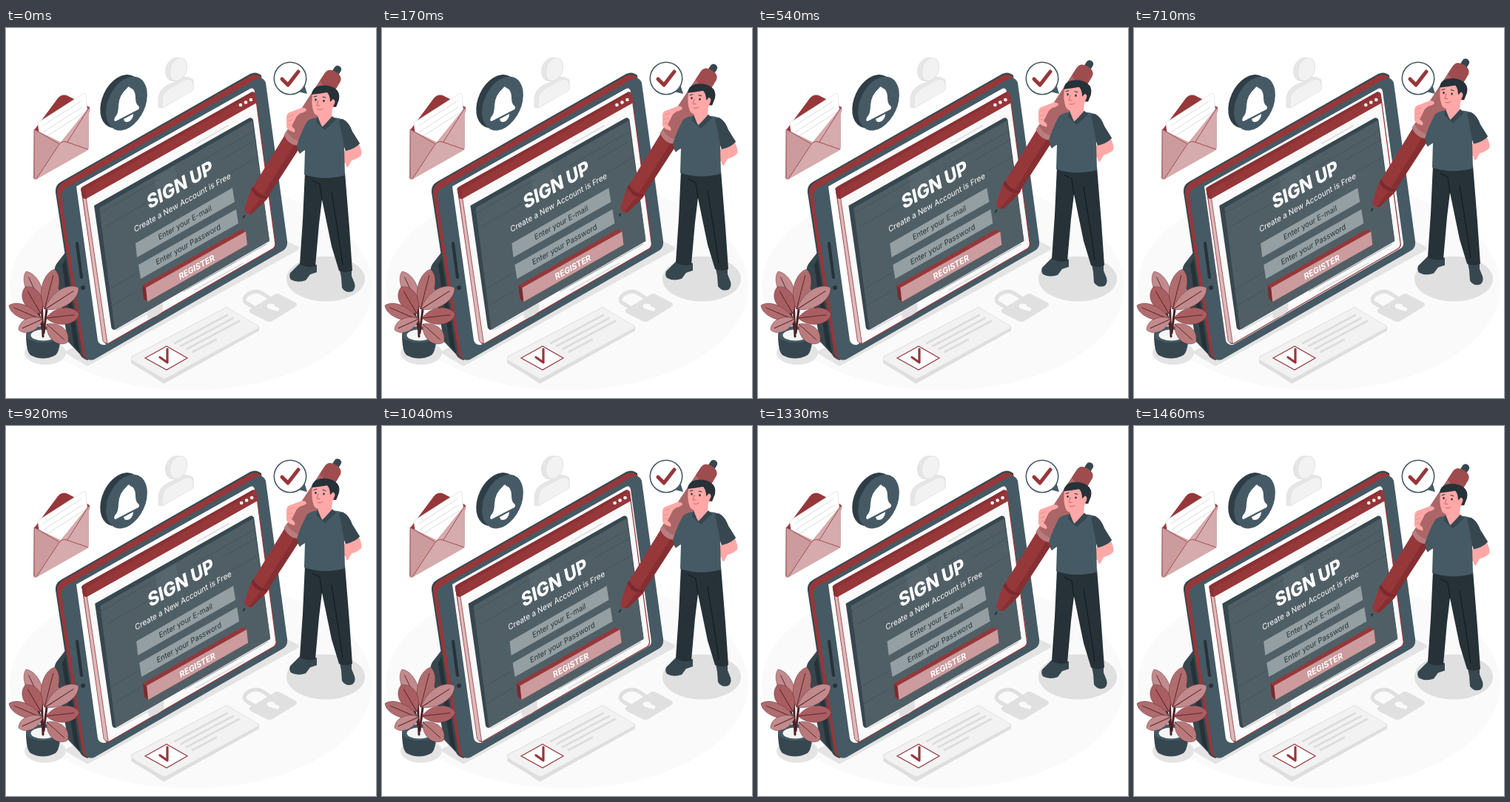
Recreate the animation shown at these times as an HTML page. Size 500x500 px, loop 1.5 s.

```html
<!DOCTYPE html>
<html lang="en">
<head>
<meta charset="utf-8">
<title>Sign up</title>
<style>
html, body { margin: 0; height: 100%; overflow: hidden; background: #fff; }
svg { display: block; width: 100vw; height: 100vh; }
text { font-family: Inter, Roboto, sans-serif; text-anchor: middle; }
.ink { fill: #263238; } .slate { fill: #37474f; } .steel { fill: #455a64; }
.red { fill: #96373a; } .wine { fill: #7b2a2e; } .rose { fill: #cb9b9d; } .skin { fill: #ffa8a7; }
.line { fill: none; stroke-linecap: round; stroke-linejoin: round; }
</style>
</head>
<body>
<svg viewBox="0 0 500 500">
  <ellipse cx="250" cy="349" rx="245" ry="141" fill="#fafafa"/>
  <g fill="#e4e4e4">
    <path d="M78 438L110 457 393 301Q398 298 394 295L378 287Z"/>
    <ellipse cx="53" cy="439" rx="28" ry="16"/>
    <ellipse cx="432" cy="339" rx="53" ry="30.500" fill="#e0e0e0"/>
  </g>

  <!-- person icon -->
  <g stroke="#e0e0e0" stroke-width=".8">
    <path d="M206 107V97Q206 84 217 78L241 66Q248 66 253 70V83L211 108Z" fill="#e6e6e6"/>
    <path d="M211 108V99Q211 87 222 81L240 71Q252 66 253 77V84Z" fill="#f2f2f2"/>
    <ellipse cx="228" cy="56" rx="12" ry="16" transform="rotate(20 228 56)" fill="#e6e6e6"/>
    <ellipse cx="233" cy="56" rx="11" ry="16" transform="rotate(20 233 56)" fill="#f2f2f2"/>
  </g>

  <!-- bell badge -->
  <ellipse cx="155" cy="99" rx="25" ry="38" transform="rotate(25 155 99)" fill="#2f3e46"/>
  <ellipse cx="163" cy="102" rx="25" ry="38.500" transform="rotate(25 163 102)" class="steel"/>
  <path d="M163 82Q166 77 168 81Q175 83 175 94Q175 103 179 105Q181 108 179 110L148 126Q145 126 147 121Q152 116 152 105Q153 90 163 82ZM159 123L172 116Q172 122 167 126Q160 129 159 123Z" fill="#fff"/>

  <!-- envelope -->
  <path d="M38 138L70 95Q76 88 84 92L113 107 109 145 45 178Z" class="red"/>
  <path d="M43 128L104 89Q107 87 108 90L112 142 75 165 47 158Z" fill="#fff" stroke="#ddd" stroke-width=".7"/>
  <path d="M50 132L101 99M51 140L103 107M52 148L104 115" class="line" stroke="#ddd"/>
  <path d="M38 137L74 154 112 107V161Q112 164 109 166L42 204Q38 206 38 202Z" fill="#d5abad"/>
  <path d="M38 137L72 156 41 204Q37 206 37 202Z" fill="#cb9b9d"/>
  <path d="M41 204L72 157Q76 152 82 154L111 164M83 154L112 108M38 137L71 156M38 138V203" class="line" stroke="#96373a" stroke-width=".8"/>

  <!-- tablet -->
  <path d="M82 301L68 319Q64 326 67 333L84 424 102 443 100 300Z" class="slate"/>
  <path d="M84 303L76 321 92 430 102 443 100 300Z" class="ink"/>
  <path d="M67 222Q66 213 74 208L330 62Q338 58 345 64L375 290 110 449Q101 446 100 440Z" class="slate"/>
  <path d="M69 224Q68 215 76 209L331 64Q339 61 345 67L372 292 111 448Q104 445 103 440Z" class="red"/>
  <path d="M75 229Q74 220 81 216L336 70Q347 64 351 74L380 288Q381 297 374 301L119 448Q109 451 107 441Z" class="steel"/>
  <path d="M95 214L330 82Q335 80 336 86L364 291Q364 296 360 298L134 428Q126 429 124 422Z" fill="#fff"/>
  <path d="M96 291L102 337" class="line" stroke="#263238" stroke-width="4"/>
  <circle cx="104" cy="351" r="3" class="ink"/>

  <!-- browser window and form -->
  <g id="form">
    <path d="M102 218L332 87Q336 86 337 90L364 292Q364 296 361 298L139 426Q134 428 133 423Z" fill="#fafafa" stroke="#96373a" stroke-width="1.300"/>
    <path d="M102 218L108 228 137 426Q134 427 131 423Z" fill="#dcb9ba" stroke="#96373a" stroke-width=".8"/>
    <path d="M101 217Q102 215 106 213L332 87Q336 86 337 90L339 101 108 231Q104 231 103 228Z" class="red"/>
    <path d="M101 217Q102 215 106 213L332 87 334 90 107 218 108 231Q104 231 103 228Z" class="wine" opacity=".45"/>
    <g fill="#fff"><circle cx="317" cy="104" r="2.300"/><circle cx="324" cy="100.500" r="2.300"/><circle cx="331" cy="97" r="2.300"/></g>
    <path d="M258 156L300 132M150 408L190 386M255 354L320 318M245 352L310 316" class="line" stroke="#e0e0e0" stroke-width="2"/>
    <path d="M190 382L212 371V382Q205 390 192 393Z" fill="#e0e0e0"/>
    <path d="M119 240L328 122Q332 120 334 124L356 287 146 408Q142 407 142 402Z" class="slate"/>
    <path d="M126 243L333 125 356 288 147 408Z" fill="#505f66"/>
    <path d="M127 250L208 204M135 268L189 237M250 188L336 139M290 178L338 151M139 353L178 331M142 376L178 355M240 356L352 292M302 196L341 174" class="line" stroke="#37474f" opacity=".45"/>
    <path d="M200 202L228 186 234 216 206 232Z" fill="#fff" opacity=".04"/>
    <path d="M175 291L306 216 309 235 177 310ZM179 320L311 245 314 264 182 339Z" fill="#949fa3"/>
    <path d="M184 348L318 272 324 275 326 293 191 370 186 366Z" class="red"/>
    <path d="M184 348L189 352 191 370 186 366Z" class="wine"/>
    <path d="M189 351L324 275 326 293 191 370Z" class="rose"/>
    <g id="labels"></g>
  </g>

  <!-- card -->
  <path d="M170 451L297 384 342 409 213 481Z" fill="#e6e6e6"/>
  <path d="M169 444L298 377 342 403V409L214 480 169 453Z" fill="#dedede"/>
  <path d="M169 445L295 379Q298 377 301 379L340 402Q343 404 340 406L217 473Q214 475 211 473L169 448Z" fill="#f2f2f2" stroke="#e0e0e0" stroke-width=".7"/>
  <path d="M188 446L217 430 245 446 217 462Z" fill="#fff" stroke="#96373a" stroke-width="1.200"/>
  <path d="M208 445L218 452V434" class="line" stroke="#96373a" stroke-width="3.200"/>
  <path d="M228 426L299 388M236 430L307 392M244 434L315 396M252 438L284 421" class="line" stroke="#dcdcdc" stroke-width="2.600"/>

  <!-- lock -->
  <path d="M337 379L324 371Q319 365 328 359Q338 353 347 359L361 368" class="line" stroke="#e0e0e0" stroke-width="5"/>
  <path d="M330 380L363 360Q366 358 370 360L391 371Q395 374 391 377L360 396Q356 398 352 396L330 385Q327 382 330 380Z" fill="#e0e0e0"/>
  <ellipse cx="358" cy="376" rx="5.500" ry="3.500" fill="#fafafa"/>
  <path d="M359 374L370 379 367 383 355 379Z" fill="#fafafa"/>

  <!-- plant -->
  <path d="M27 413Q27 437 33 442Q50 451 67 442Q73 437 74 413Z" class="slate"/>
  <ellipse cx="50.500" cy="414" rx="23.500" ry="11" class="steel"/>
  <ellipse cx="50.500" cy="415" rx="17" ry="7.500" fill="#f5f5f5"/>
  <path d="M50 417L48 366M51 412L55 380M49 405L44 385" class="line" stroke="#4b2226" stroke-width="3"/>
  <g id="plant"></g>

  <!-- speech bubble -->
  <path d="M395 86L407 89 403 76Z" class="steel"/>
  <circle cx="384" cy="68" r="21.700" fill="#fff" stroke="#455a64" stroke-width="1.600"/>
  <path d="M373 69L381 77 395 59" class="line" stroke="#96373a" stroke-width="5"/>

  <!-- man with pen -->
  <g id="man">
    <path d="M407 124Q398 138 390 158L397 170 413 156Z" class="slate"/>
    <g transform="translate(448 56) rotate(32.200)">
      <rect x="-5" y="-5" width="10" height="16" rx="4.500" class="slate"/>
      <path d="M-12 14Q-12 4 0 4Q12 4 12 14L14 112Q0 120-14 112Z" fill="#ac6668"/>
      <path d="M-12 14Q-12 4 0 4Q12 4 12 14V26Q0 32-12 26Z" class="red" opacity=".55"/>
      <path d="M-14 107Q0 115 14 107V114Q0 122-14 114Z" fill="#b97d7f"/>
      <path d="M-13 114Q0 122 13 114L12 196Q0 203-12 196Z" class="red"/>
      <path d="M5 118L13 114 12 196 5 199Z" class="wine" opacity=".6"/>
      <path d="M-12.500 193Q0 201 12.500 193V200L6 227Q0 233-6 227L-12.500 200Z" class="red"/>
      <path d="M-12.500 194Q0 202 12.500 194V199Q0 207-12.500 199Z" class="wine"/>
      <path d="M5 204L12.500 200 6 227 2 229Z" class="wine" opacity=".6"/>
      <path d="M-1 234V237" class="line" stroke="#263238" stroke-width="2"/>
    </g>
    <path d="M398 317L394 321 384 331Q382 336 385 340Q394 345 405 341L411 333 420 330V320Z" class="slate"/>
    <path d="M451 327L453 337 454 351Q459 359 468 356Q473 352 471 345L467 335V327Z" class="slate"/>
    <path d="M404 195L401 260 397 319Q406 325 418 322L423 265 427 232 440 295 450 328Q459 332 468 328L464 270 458 195Z" class="ink"/>
    <path d="M427 232L424 211 414 206M440 222L450 285 455 320" class="line" stroke="#0f171b"/>
    <path d="M461 161L476 155Q482 167 480 172Q475 177 467 179L462 188Q459 188 459 183L456 181 451 187Q448 187 450 182L446 184Q444 181 449 176L451 172 445 172Q448 166 455 167L461 165Z" class="skin"/>
    <path d="M407 126Q414 121 422 121L440 121Q451 121 458 125Q464 129 468 140L478 156Q472 163 459 166L457 160 458 199Q430 207 403 198L404 165 397 169 393 159Q398 142 407 126Z" class="steel"/>
    <path d="M450 125Q454 142 457 160L459 166Q472 163 478 156L468 140Q464 128 455 123Z" class="slate"/>
    <path d="M422 109L441 108 440 122 428 134 421 125Z" class="skin"/>
    <path d="M421 119L427 134 432 129 441 119 446 124 431 138 426 134 419 127Z" class="slate"/>
    <path d="M414 90Q412 104 416 114Q419 120 427 119Q437 118 441 108Q448 107 448 99Q446 92 440 95L438 82 418 84Z" class="skin"/>
    <path d="M413 90Q414 80 424 78Q437 76 445 82Q452 87 450 97L446 107 442 106Q447 98 442 96L438 100Q438 91 434 87Q423 89 413 90Z" class="ink"/>
    <ellipse cx="418.500" cy="97" rx="1.200" ry="1.700" class="ink"/>
    <ellipse cx="429.500" cy="98.500" rx="1.200" ry="1.700" class="ink"/>
    <path d="M416 93L420 92M428 93L432 94" class="line" stroke="#263238"/>
    <path d="M422 98L420 105 424 105M421 110Q425 112 428 109" class="line" stroke="#c56a6c"/>
    <path d="M379 121Q379 114 386 113L399 108Q405 107 406 111Q404 114 398 115L393 119 386 133Q392 137 390 141Q381 139 379 134Z" class="skin"/>
    <path d="M382 120L389 117M381 126L387 124M382 131L386 130" class="line" stroke="#e58a89" stroke-width=".8"/>
  </g>
</svg>
<script>
const byId = id => document.getElementById(id);

// text, x and baseline of its centre, size, weight, colour
const labels = [
  ["SIGN UP", 237, 220.500, 25, 800, "#fff"],
  ["Create a New Account is Free", 239, 239.500, 10.700, 400, "#fff"],
  ["Enter your E-mail", 242.500, 266.500, 10.200, 400, "#263238"],
  ["Enter your Password", 247, 296, 10.300, 400, "#263238"],
  ["REGISTER", 258.500, 327, 11.300, 700, "#fff"],
];
byId("labels").innerHTML = labels.map(([text, x, y, size, weight, fill]) =>
  `<text transform="matrix(.866 -.49 .22 .98 ${x} ${y})" font-size="${size}" font-weight="${weight}" fill="${fill}">${text}</text>`).join("");

// base x, y, tip x, y, half width, colour
const leaves = [
  [50, 378, 27, 329, 10, "#c18a8c"],
  [52, 380, 66, 326, 11, "#b06d6f"],
  [53, 380, 98, 351, 11, "#c18a8c"],
  [47, 386, 26, 350, 12, "#a95f62"],
  [48, 394, 4, 375, 9, "#b06d6f"],
  [54, 392, 99, 387, 11, "#a95f62"],
  [50, 393, 17, 408, 9, "#c18a8c"],
  [55, 400, 83, 425, 11, "#b97a7c"],
];
byId("plant").innerHTML = leaves.map(([x, y, tipX, tipY, half, fill]) => {
  const length = Math.hypot(tipX - x, tipY - y);
  const angle = Math.atan2(tipY - y, tipX - x) * 180 / Math.PI;
  const bulge = half * 1.35;
  return `<g transform="translate(${x} ${y}) rotate(${angle})" stroke="#5a2327">
    <path d="M0 0C${length * .3} ${-bulge} ${length * .85} ${-bulge} ${length} 0C${length * .85} ${bulge} ${length * .3} ${bulge} 0 0Z" fill="${fill}" stroke-width=".4"/>
    <path d="M0 0H${length * .85}" stroke-width=".9"/></g>`;
}).join("");

const LOOP = 1500, STEPS = 36;
const shake = [0, -1, 2, -4, 4, -4, 4, -4, 2, -1, 0];

function draw(now) {
  const step = Math.floor(now % LOOP / LOOP * STEPS + .02) + 1;
  const phase = step / STEPS % 1;
  const key = Math.floor(phase * 10);
  const dx = shake[key] + (shake[key + 1] - shake[key]) * (phase * 10 - key);
  const dy = -10 * (1 - Math.abs(1 - 2 * phase));
  byId("form").setAttribute("transform", `translate(${dx + .27} 0)`);
  byId("man").setAttribute("transform", `translate(0 ${dy + .55})`);
}

const start = performance.now();
function tick() {
  draw(performance.now() - start);
  requestAnimationFrame(tick);
}
tick();
</script>
</body>
</html>
```
